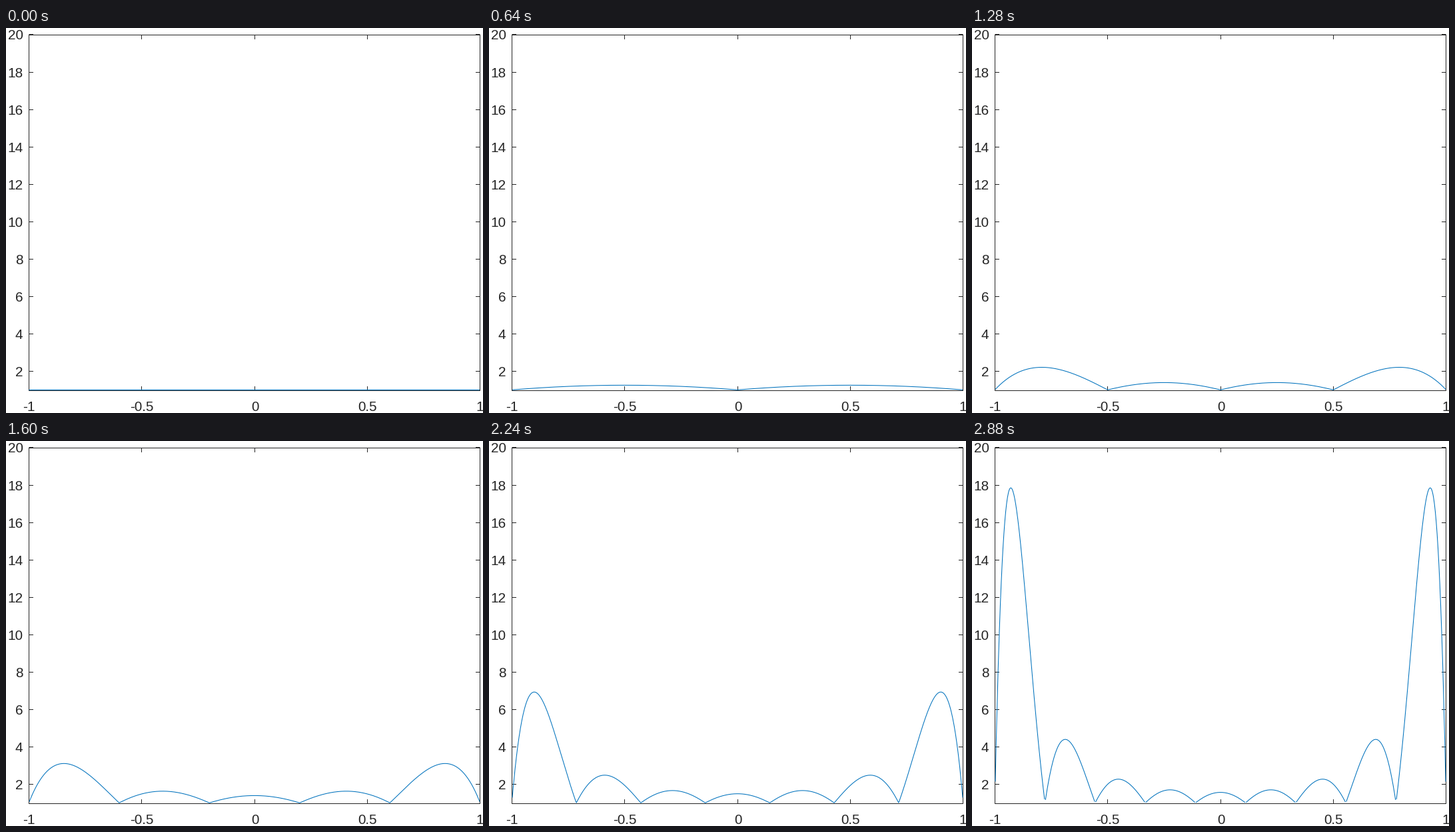
Write a matplotlib script that moves like this. It is 716 px wide and 577 px high and loops after 3.2 s.

```python
import numpy as np
import matplotlib.pyplot as plt
from matplotlib.animation import FuncAnimation

WIDTH, HEIGHT, DPI = 716, 577, 64
PX = 72 / DPI                      # points per pixel
LEFT, RIGHT, TOP, BOTTOM = 34.5, 711.5, 10.5, 543.5
TICK = 6.5
INK, BLUE = "#262626", "#0072BD"

plt.rcParams["font.family"] = "Liberation Sans"


def to_px_x(x):
    return 373 + 338.7 * x


def to_px_y(y):
    return 542.35 - 28.02 * (y - 1)


def lebesgue(x, degree):
    """Sum of |Lagrange basis| on equispaced nodes, undefined at the nodes."""
    nodes = 1 - 2 * np.arange(degree + 1) / max(degree, 1)
    total = np.zeros_like(x)
    for j, node in enumerate(nodes):
        others = np.delete(nodes, j)
        total += np.abs(np.prod((x[:, None] - others) / (node - others), axis=1))
    on_node = np.abs(x[:, None] - nodes).min(axis=1) < 1e-10
    total[on_node] = np.nan
    return total


fig = plt.figure(figsize=(WIDTH / DPI, HEIGHT / DPI), dpi=DPI, facecolor="white")
ax = fig.add_axes([0, 0, 1, 1])
ax.set(xlim=(0, WIDTH), ylim=(HEIGHT, 0))
ax.axis("off")


def stroke(xs, ys):
    ax.plot(xs, ys, color=INK, lw=PX, snap=False, solid_capstyle="butt",
            solid_joinstyle="miter")


def label(x, y, value, align):
    ax.text(x, y, f"{value:g}", size=20.8 * PX, color=INK, ha=align, va="baseline")


stroke([LEFT, RIGHT, RIGHT, LEFT, LEFT, RIGHT],
       [TOP, TOP, BOTTOM, BOTTOM, TOP, TOP])

for value in np.linspace(-1, 1, 5):
    x = np.floor(to_px_x(value)) + 0.5
    stroke([x, x], [TOP, TOP + TICK])
    stroke([x, x], [BOTTOM, BOTTOM - TICK])
    label(x, 574.5, value, "center")

for value in range(2, 21, 2):
    y = np.floor(to_px_y(value)) + 0.5
    stroke([LEFT, LEFT + TICK], [y, y])
    stroke([RIGHT, RIGHT - TICK], [y, y])
    label(25.5, y + 7.5, value, "right")

grid = np.linspace(-1, 1, 1000)
curve, = ax.plot([], [], color=BLUE, lw=1.04 * PX, snap=False, zorder=3,
                 solid_capstyle="butt", solid_joinstyle="round")


def update(degree):
    curve.set_data(to_px_x(grid), to_px_y(lebesgue(grid, degree)))
    return curve,


anim = FuncAnimation(fig, update, frames=10, init_func=lambda: update(0),
                     interval=320, repeat=True, repeat_delay=0)
plt.show()
```
